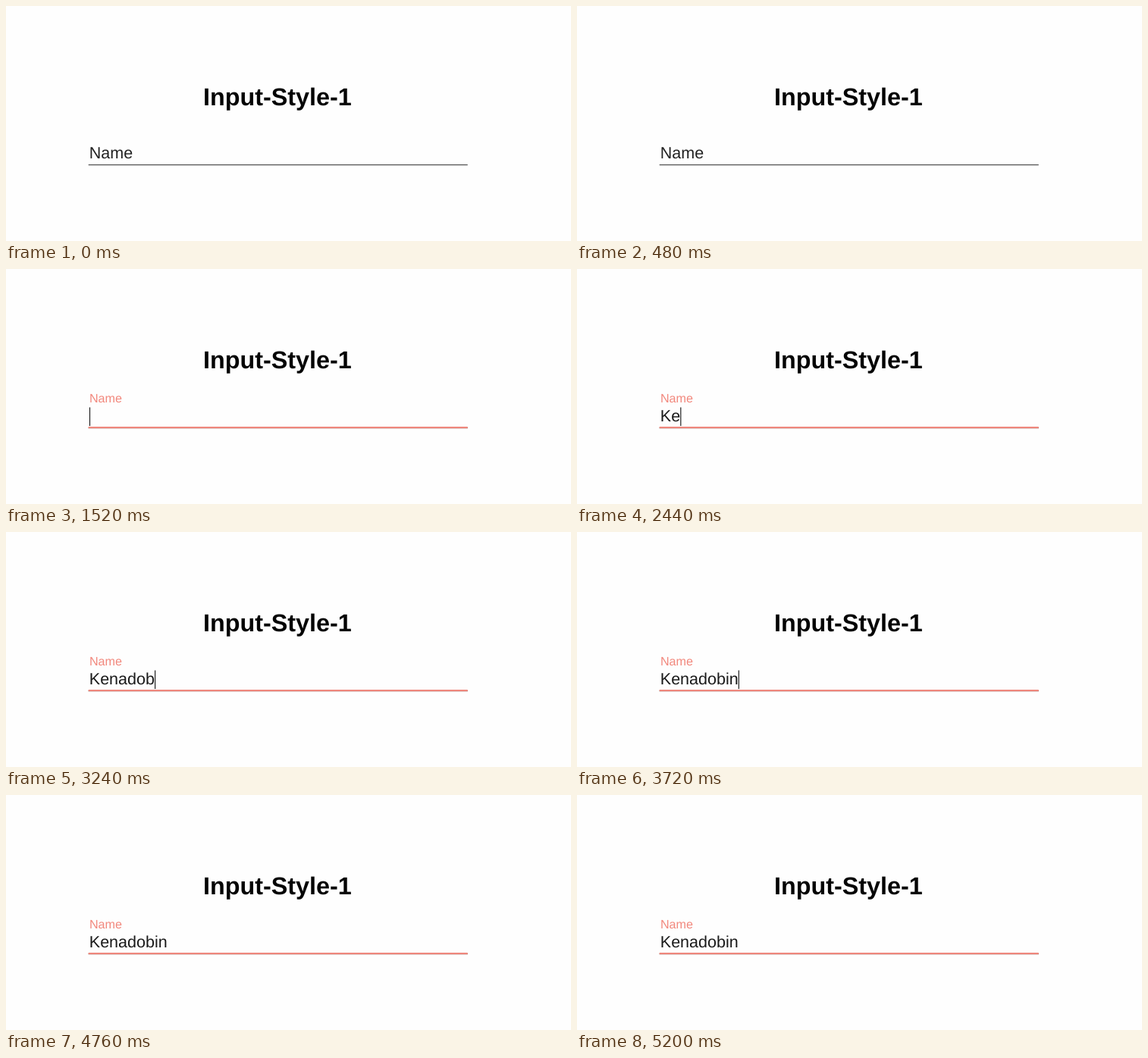
An HTML page for the animation above (5280 ms loop, 745 px wide and 310 px high).

```html
<!DOCTYPE html>
<html lang="en">
<head>
<meta charset="utf-8">
<title>Input-Style-1</title>
<style>
  html, body { margin: 0; width: 100%; height: 100%; overflow: hidden; background: #fefefe; }
  svg { display: block; width: 745px; height: 310px; }
  text { font-family: Arial, "Liberation Sans", sans-serif; text-rendering: geometricPrecision; }
  .title { font-size: 32.3px; font-weight: bold; fill: #050505; }
  .field { font-size: 21.5px; fill: #1a1a1a; }
  .label { fill: #222; animation: float 5280ms infinite; }
  .accent { animation: grow 5280ms infinite; }

  /* focus at 1120 ms, settled at 1520 ms */
  @keyframes float {
    0%, 21.2121% { transform: translate(109.8px, 201.4px); fill: #222; animation-timing-function: ease; }
    28.7879%, 100% { transform: translate(109.9px, 176px) scale(.752); fill: #f2887d; }
  }
  @keyframes grow {
    0%, 21.2121% { x: 358.7px; width: 0; animation-timing-function: ease; }
    28.7879%, 100% { x: 108.7px; width: 500px; }
  }
</style>
</head>
<body>
<svg viewBox="0 0 745 310">
  <text class="title" x="260.1" y="131.2">Input-Style-1</text>
  <rect x="108.7" y="208.9" width="500" height="1.3" fill="#555"/>
  <rect class="accent" x="108.7" y="208" width="500" height="2.2" fill="#ef877c"/>
  <text class="field label">Name</text>
  <text class="field" id="typed" x="109.8" y="201.4"></text>
  <rect id="caret" y="182.5" width="1.2" height="24.5" fill="#222" visibility="hidden"/>
</svg>
<script>
  const LOOP = 5280;
  const name = "Kenadobin";
  const keyTimes = [2120, 2440, 2600, 2720, 2880, 3120, 3240, 3360, 3560];
  const caretOn = [[1120, 1640], [2120, 4080]];
  const typed = document.getElementById("typed");
  const caret = document.getElementById("caret");
  let start;

  function draw(now) {
    if (start === undefined) {
      start = now;
      document.getAnimations().forEach(a => { a.startTime = start; });
    }
    const t = (now - start) % LOOP;
    const text = name.slice(0, keyTimes.filter(k => k <= t).length);
    if (typed.textContent !== text) typed.textContent = text;
    const width = text ? typed.getComputedTextLength() : 0;
    caret.setAttribute("x", 109.9 + width);
    const shown = caretOn.some(([from, to]) => t >= from && t < to);
    caret.setAttribute("visibility", shown ? "visible" : "hidden");
    requestAnimationFrame(draw);
  }
  requestAnimationFrame(draw);
</script>
</body>
</html>
```
